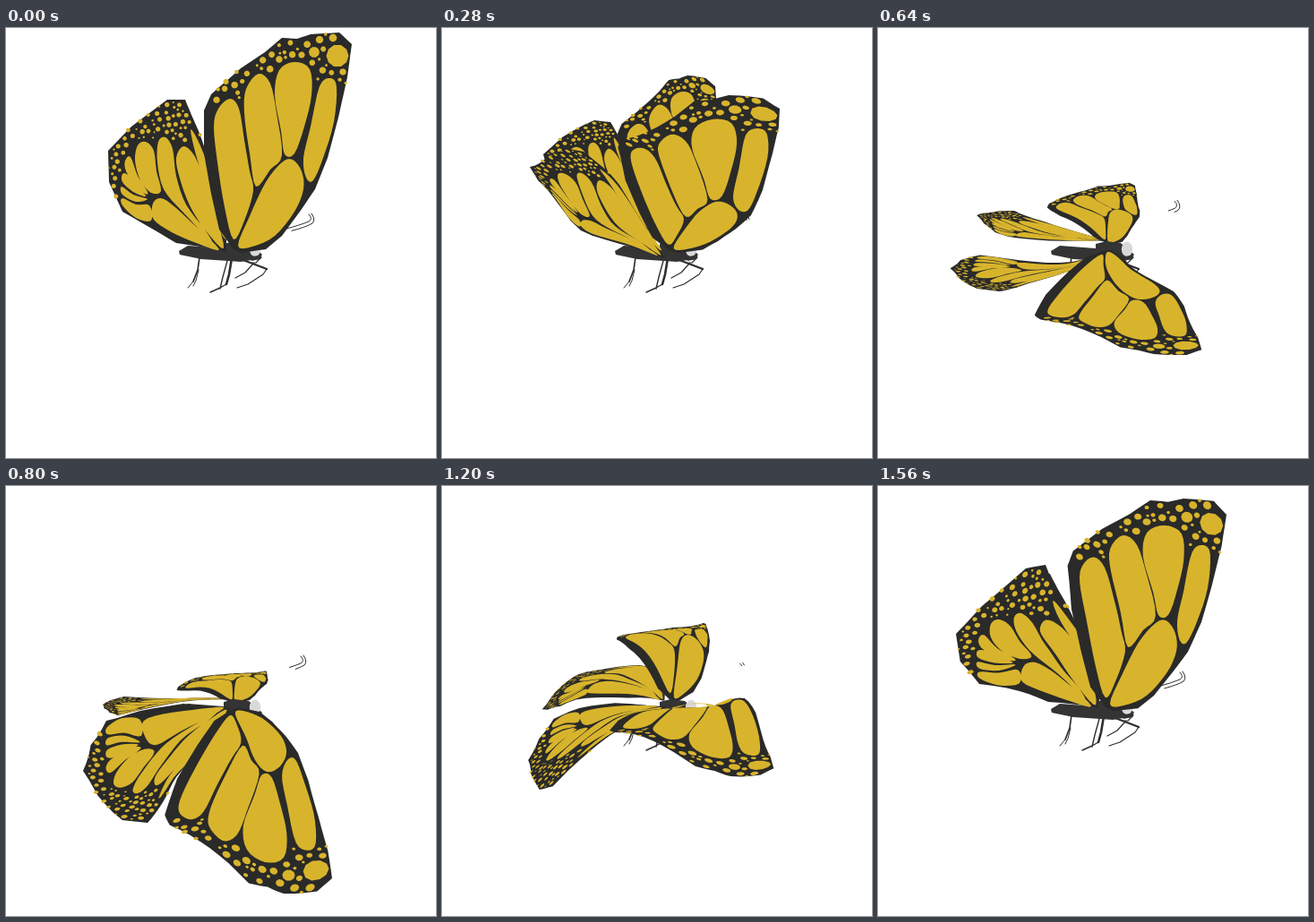
Write an HTML page that moves like this. It is 480 px wide and 480 px high and loops after 1600 ms.

```html
<!DOCTYPE html>
<html lang="en">
<head>
<meta charset="utf-8">
<title>Butterfly</title>
<style>
  html, body { margin: 0; width: 100%; height: 100%; overflow: hidden; background: #fff; }
  svg { display: block; width: 100vw; height: 100vh; }
  .dark { fill: #2a2a29; }
  .gold { fill: #d8b42d; }
  .line { fill: none; stroke: #2e2e2f; stroke-linejoin: round; stroke-linecap: round; }
</style>
</head>
<body>
<svg viewBox="0 0 480 480">
  <g id="far"></g>
  <g id="feelers" class="line" stroke-width="1">
    <path d="M338 208Q343 213 338 216Q326 221 305 226"/>
    <path d="M341 207Q346 214 342 218Q330 225 301 230"/>
  </g>
  <g class="line">
    <path stroke-width="1.7" d="M216 256L214 270L209 283"/>
    <path stroke-width="1" d="M209 283L203 290M215 270L212 282L209 288"/>
    <path stroke-width="2.6" d="M252 257L249 275L246 286"/>
    <path stroke-width="1.4" d="M246 286L239 290L228 295M247 260L242 278L239 291"/>
    <path stroke-width="2.2" d="M262 258L278 264L291 269"/>
    <path stroke-width="1.2" d="M291 269L287 275L270 286L258 290M285 256L279 262L275 262M276 263L267 273L256 279"/>
  </g>
  <path fill="#343435" d="M243 241L255 238L271 240L285 252L284 258L274 259L262 261L248 260L218 258L194 253L193 249L203 243L243 246Z"/>
  <ellipse cx="278" cy="247" rx="6.2" ry="8.2" fill="#d9d9da"/>
  <path fill="#343435" d="M270 253Q278 257 286 252L284 258L274 260Z"/>
  <g id="near"></g>
</svg>
<script>
const LOOP = 1600, STEP = 40;
const times = [0, 280, 480, 800, 1080, 1360, 1560];

// Landmark positions at each key time; the first row is also the rest shape.
// Forewing: root, inner corner, top, tip corners, outer edge, bulge, vein forks.
const nearFore = [
  [256,248, 222,95, 262,45, 340,7, 386,18, 371,100, 345,180, 308,232, 279,181, 311,144],
  [256,249, 198,135, 231,115, 320,75, 377,90, 369,140, 345,209, 308,238, 273,213, 300,193],
  [256,247, 178,249, 222,240, 308,238, 361,247, 352,265, 337,276, 275,266, 250,262, 285,268],
  [254,249, 179,365, 217,397, 310,455, 364,438, 349,370, 326,298, 297,263, 265,287, 286,320],
  [255,248, 189,326, 225,352, 310,412, 366,396, 354,345, 335,270, 300,253, 263,268, 291,284],
  [256,248, 190,185, 228,164, 340,176, 378,180, 366,185, 341,192, 308,236, 274,210, 312,187],
  [256,248, 213,92, 250,48, 341,14, 389,32, 373,110, 346,185, 308,234, 279,184, 313,147]
];
const farFore = [
  [256,246, 226,110, 262,60, 325,30, 350,38, 345,105, 325,175, 295,225, 275,185, 300,155],
  [254,242, 197,120, 225,87, 274,53, 305,65, 305,100, 300,170, 285,220, 258,170, 275,140],
  [258,240, 190,163, 213,147, 257,125, 286,130, 291,165, 294,195, 280,228, 256,198, 264,182],
  [255,242, 192,228, 212,214, 280,208, 291,207, 292,214, 291,221, 278,234, 253,218, 265,212],
  [257,240, 197,203, 215,198, 285,186, 295,184, 296,190, 295,205, 283,228, 258,197, 272,188],
  [258,242, 198,127, 220,110, 283,104, 301,104, 306,130, 305,160, 298,200, 266,165, 275,138],
  [257,245, 222,115, 258,65, 328,35, 352,42, 345,110, 325,175, 295,225, 275,185, 300,155]
];
// Hindwing: root, leading edge (3), outer edge, top corners, inner edge, vein fork, cell top.
const nearHind = [
  [246,249, 190,240, 163,224, 130,205, 114,137, 180,80, 200,80, 224,140, 162,188, 178,122],
  [248,256, 195,240, 155,226, 125,190, 98,155, 138,134, 158,138, 198,175, 155,210, 156,162],
  [250,256, 205,276, 165,262, 118,237, 79,208, 98,195, 118,198, 155,232, 150,238, 117,213],
  [250,248, 198,243, 150,251, 112,262, 86,318, 130,373, 158,376, 190,325, 155,290, 147,343],
  [250,246, 192,241, 152,250, 122,262, 93,318, 135,368, 160,367, 195,310, 153,285, 148,333],
  [248,247, 195,244, 155,243, 125,252, 98,272, 82,270, 85,263, 180,225, 157,240, 115,246],
  [246,247, 190,241, 158,229, 113,221, 87,165, 165,92, 187,88, 222,155, 159,196, 160,142]
];
const farHind = [
  [246,247, 200,236, 172,215, 145,195, 130,145, 185,95, 202,92, 224,145, 172,185, 185,125],
  [248,238, 200,232, 165,215, 138,190, 113,141, 170,103, 188,105, 205,140, 165,185, 170,128],
  [252,237, 190,233, 157,216, 138,197, 112,166, 158,160, 176,163, 198,185, 162,203, 155,175],
  [250,238, 195,241, 150,250, 125,256, 109,248, 117,239, 132,235, 180,237, 152,247, 130,242],
  [250,237, 200,236, 165,242, 140,250, 114,260, 128,245, 142,239, 215,217, 165,240, 150,240],
  [246,243, 215,238, 155,229, 120,237, 110,222, 178,153, 188,152, 222,175, 162,196, 168,170],
  [246,245, 198,236, 168,220, 140,208, 125,160, 178,100, 192,98, 222,155, 168,190, 178,135]
];
// Feelers: shift x, shift y, visible length from the tip.
const feelerKeys = [[0,0,37], [0,3,4], [-4,-9,8], [-9,-18,23], [-9,-16,7], [0,-1,5], [-1,0,35]];

const foreEdge = [254,247, 238,225, 229,185, 221,140, 221,92, 229,74, 262,45, 289,27, 308,11, 325,12, 340,7,
  372,5, 386,18, 381,55, 371,100, 359,145, 345,180, 328,205, 308,232, 290,247, 262,251];
const foreCells = [
  [254,236, 244,200, 236,150, 232,110, 237,90, 250,79, 260,90, 266,125, 272,160, 276,182, 266,215],
  [279,177, 272,140, 266,95, 268,68, 282,51, 295,62, 302,95, 308,142, 295,158],
  [311,141, 307,115, 300,75, 305,47, 322,38, 339,46, 341,75, 333,110, 322,140],
  [335,167, 332,145, 340,110, 350,65, 362,56, 369,66, 366,105, 354,145, 343,170],
  [259,243, 272,210, 290,172, 308,150, 320,147, 330,160, 332,180, 322,205, 300,232, 275,244]
];
const hindEdge = [246,250, 230,246, 190,240, 163,224, 130,205, 115,172, 114,137, 140,110, 180,80, 200,80,
  207,97, 215,115, 224,140, 234,180, 246,230];
const hindCells = [
  [243,246, 222,225, 205,198, 194,168, 190,145, 198,132, 210,142, 222,170, 233,205],
  [229,238, 198,206, 176,180, 169,150, 170,127, 178,122, 186,135, 190,165, 201,197, 222,225],
  [162,184, 150,170, 144,148, 147,131, 156,127, 165,137, 168,160, 173,182],
  [155,185, 145,176, 134,160, 133,148, 139,144, 147,165, 158,183],
  [156,188, 142,183, 130,172, 130,163, 136,164, 148,178],
  [158,191, 145,194, 130,186, 129,177, 142,186],
  [162,215, 145,212, 130,198, 130,190, 145,197, 160,198],
  [168,191, 180,193, 205,215, 238,247, 215,241, 185,228, 165,214, 163,200],
  [206,114, 214,125, 228,160, 240,205, 247,234, 240,228, 225,180, 213,145]
];

const pairs = a => Array.from({ length: a.length / 2 }, (_, i) => [a[2 * i], a[2 * i + 1]]);
const dist = (a, b) => Math.hypot(a[0] - b[0], a[1] - b[1]);

function straight(pts) {
  return pts.flatMap((p, i) => {
    const q = pts[(i + 1) % pts.length];
    return [0, 1 / 3, 2 / 3].map(u => [p[0] + (q[0] - p[0]) * u, p[1] + (q[1] - p[1]) * u]);
  });
}

function smooth(pts) {
  const n = pts.length;
  return pts.flatMap((b, i) => {
    const a = pts[(i + n - 1) % n], c = pts[(i + 1) % n], d = pts[(i + 2) % n];
    return [0, 0.25, 0.5, 0.75].map(u => [0, 1].map(k =>
      b[k] + u / 2 * (c[k] - a[k] + u * (2 * a[k] - 5 * b[k] + 4 * c[k] - d[k] +
        u * (3 * (b[k] - c[k]) + d[k] - a[k])))));
  });
}

const circle = (x, y, r) => Array.from({ length: 10 }, (_, i) =>
  [x + r * Math.cos(i * Math.PI / 5), y + r * Math.sin(i * Math.PI / 5)]);

function inside(p, poly) {
  let hit = false;
  poly.forEach((a, i) => {
    const b = poly[(i + 1) % poly.length];
    if ((a[1] > p[1]) !== (b[1] > p[1]) &&
        p[0] < a[0] + (b[0] - a[0]) * (p[1] - a[1]) / (b[1] - a[1])) hit = !hit;
  });
  return hit;
}

// Packs spots into the dark rim, large ones first.
function scatter(edge, cells, dots, big, small, inRim) {
  let seed = 7;
  const rnd = () => (seed = seed * 16807 % 2147483647) / 2147483647;
  const xs = edge.map(p => p[0]), ys = edge.map(p => p[1]);
  const x0 = Math.min(...xs), y0 = Math.min(...ys);
  const w = Math.max(...xs) - x0, h = Math.max(...ys) - y0;
  const walls = cells.flat();
  for (let i = 0; i < 3000; i++) {
    const p = [x0 + rnd() * w, y0 + rnd() * h], r = big + (small - big) * i / 3000;
    if (inRim(...p) && inside(p, edge) && !cells.some(c => inside(p, c)) &&
        walls.every(q => dist(p, q) > r + 3.2) && edge.every(q => dist(p, q) > r + 1.8) &&
        dots.every(d => dist(p, d) > r + d[2] + 1.4)) dots.push([...p, r]);
  }
  return dots;
}

function solve(rows, rhs) {
  const m = rows.map((r, i) => [...r, rhs[i]]), n = m.length;
  for (let c = 0; c < n; c++) {
    let best = c;
    for (let r = c + 1; r < n; r++) if (Math.abs(m[r][c]) > Math.abs(m[best][c])) best = r;
    [m[c], m[best]] = [m[best], m[c]];
    for (let r = 0; r < n; r++) {
      if (r === c) continue;
      const f = m[r][c] / m[c][c];
      if (f) for (let k = c; k <= n; k++) m[r][k] -= f * m[c][k];
    }
  }
  return m.map((r, i) => r[n] / r[i]);
}

// Thin-plate spline: each point becomes a fixed weighting of the landmarks.
function weigher(marks) {
  const bend = (a, b) => { const r = dist(a, b) / 100; return r ? r * r * Math.log(r) : 0; };
  const basis = p => [...marks.map(q => bend(p, q)), 1, p[0] / 100, p[1] / 100];
  const rows = marks.map(basis);
  for (let k = 0; k < 3; k++)
    rows.push([...marks.map((_, i) => rows[i][marks.length + k]), 0, 0, 0]);
  return p => solve(rows, basis(p)).slice(0, marks.length);
}

function makeShape(rest, edgePts, cellPts, dots, big, small, inRim) {
  const weigh = weigher(pairs(rest));
  const edge = straight(pairs(edgePts));
  const cells = cellPts.map(c => smooth(pairs(c)));
  const spots = scatter(edge, cells, dots, big, small, inRim).map(d => circle(...d));
  return { dark: [edge.map(weigh)], gold: [...cells, ...spots].map(s => s.map(weigh)) };
}

const fore = makeShape(nearFore[0], foreEdge, foreCells,
  [[370,31,12.5], [344,27,6], [365,11,4.5], [350,13,4.3], [376,49,3.8]],
  4, 1.3, (x, y) => y < 82);
const hind = makeShape(nearHind[0], hindEdge, hindCells, [], 2.8, 1,
  (x, y) => x < 135 || y < 125);

function addPath(parent, cls) {
  const el = document.createElementNS('http://www.w3.org/2000/svg', 'path');
  el.setAttribute('class', cls);
  document.getElementById(parent).append(el);
  return el;
}

const wings = [['far', hind, farHind], ['far', fore, farFore], ['near', hind, nearHind], ['near', fore, nearFore]]
  .map(([layer, shape, keys]) => ({ shape, keys, dark: addPath(layer, 'dark'), gold: addPath(layer, 'gold') }));
const feelers = document.getElementById('feelers');

// Cyclic cubic interpolation between key rows.
function pose(keys, t) {
  const n = times.length;
  const row = i => keys[(i + n) % n];
  const at = i => times[(i + n) % n] + Math.floor(i / n) * LOOP;
  let i = n - 1;
  while (times[i] > t) i--;
  const h = at(i + 1) - at(i), u = (t - at(i)) / h;
  const slope = (j, k) => (row(j + 1)[k] - row(j - 1)[k]) / (at(j + 1) - at(j - 1)) * h;
  return row(i).map((a, k) => {
    const b = row(i + 1)[k], s = u * u * (3 - 2 * u);
    return a + (b - a) * s + slope(i, k) * u * (1 - u) ** 2 - slope(i + 1, k) * u * u * (1 - u);
  });
}

function trace(polys, marks) {
  return polys.map(poly => 'M' + poly.map(w => {
    let x = 0, y = 0;
    w.forEach((f, i) => { x += f * marks[2 * i]; y += f * marks[2 * i + 1]; });
    return x.toFixed(1) + ' ' + y.toFixed(1);
  }).join('L') + 'Z').join('');
}

function draw(t) {
  for (const { shape, keys, dark, gold } of wings) {
    const marks = pose(keys, t);
    dark.setAttribute('d', trace(shape.dark, marks));
    gold.setAttribute('d', trace(shape.gold, marks));
  }
  const [dx, dy, len] = pose(feelerKeys, t);
  feelers.setAttribute('transform', `translate(${dx} ${dy})`);
  feelers.setAttribute('stroke-dasharray', `${Math.max(len, 2)} 99`);
}

let shown = -1;
const start = performance.now();
function tick() {
  const t = Math.floor((performance.now() - start) % LOOP / STEP) * STEP;
  if (t !== shown) draw(shown = t);
  requestAnimationFrame(tick);
}
tick();
</script>
</body>
</html>
```
